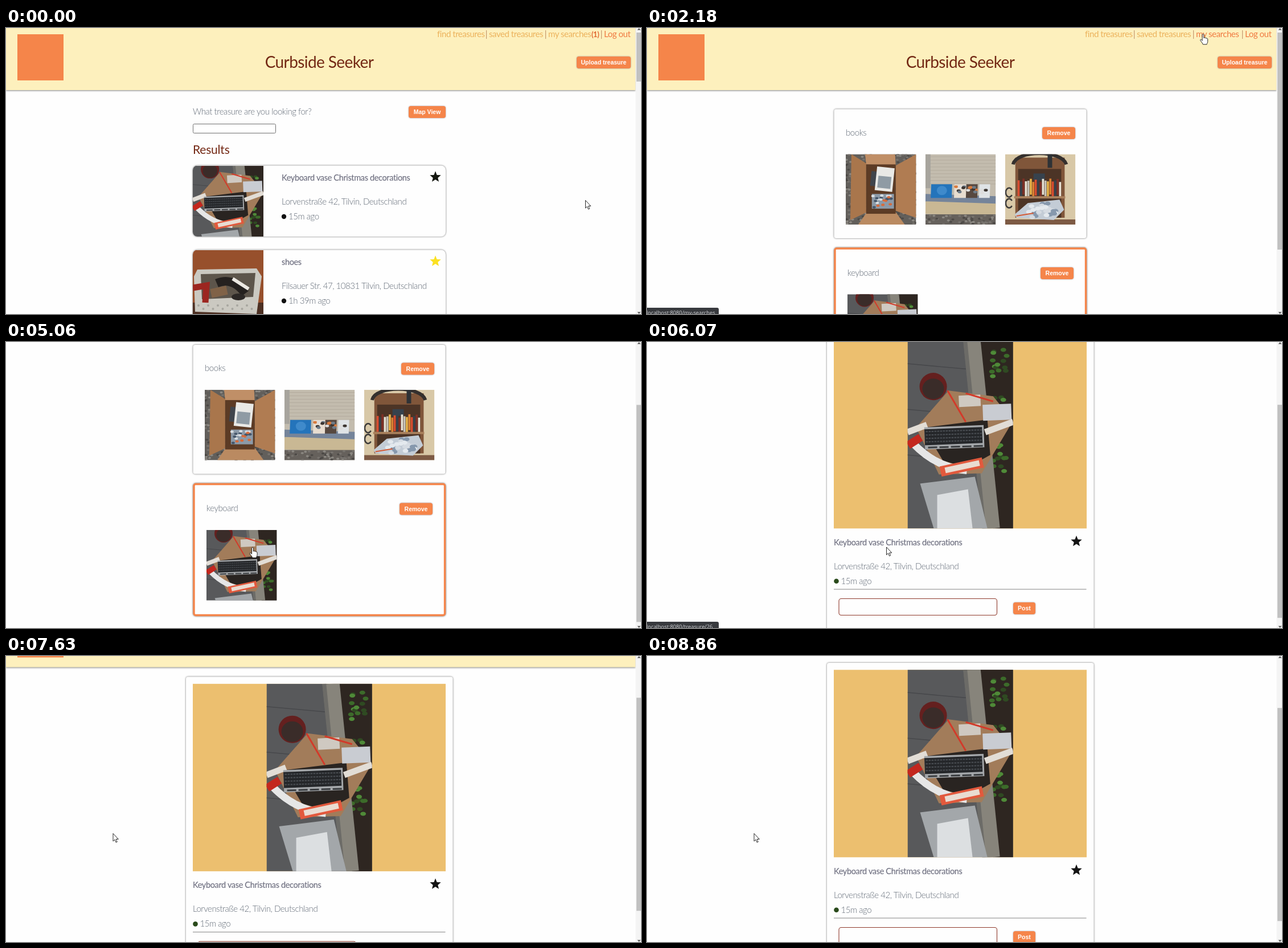
An HTML page that plays this animation: 1115x502 px, repeating every 8.93 s.

```html
<!DOCTYPE html>
<html lang="en">
<head>
<meta charset="utf-8">
<title>Curbside Seeker</title>
<style>
html, body { margin: 0; width: 100%; height: 100%; overflow: hidden; background: #fefefe; }
svg { display: block; width: 100vw; height: 100vh; }
text { font-family: Lato, "Open Sans", sans-serif; white-space: pre; }
.body { font-size: 15px; font-weight: 300; letter-spacing: -.45px; fill: #616a76; }
.name { font-size: 14.5px; letter-spacing: -.35px; fill: #6f7080; stroke: #6f7080; stroke-width: .15px; }
.nav { font-size: 15px; letter-spacing: -.45px; fill: #ecb25c; }
.nav.hot { fill: #f07a41; }
.nav.sep { fill: #8a3a1c; font-weight: 300; }
.nav.count { fill: #e0662f; font-size: 13px; font-weight: 700; }
.title { font-size: 28px; letter-spacing: -.6px; fill: #732814; text-anchor: middle; }
.sub { font-size: 21px; letter-spacing: -.2px; fill: #732814; }
.btn { font: bold 10.5px "Liberation Sans", Arial, sans-serif; fill: #fff; text-anchor: middle; }
.status { font: 9.3px "Open Sans", "Noto Sans", sans-serif; fill: #d3d5d8; }
.card { filter: drop-shadow(0 0 1.6px rgba(0,0,0,.6)); }
.raised { filter: drop-shadow(0 0 1px rgba(90,90,120,.6)); }
.bar { filter: drop-shadow(0 1px 1.6px rgba(0,0,0,.5)); }
</style>
</head>
<body>
<svg id="stage" viewBox="0 0 1115 502" preserveAspectRatio="none"></svg>
<script>
const LOOP = 8930, TICK = 78;
const ORANGE = '#f5854a';

// ---- drawing helpers
const rect = (x, y, w, h, fill, more = '') =>
  `<rect x="${x}" y="${y}" width="${w}" height="${h}" fill="${fill}" ${more}/>`;
const poly = (pts, fill) => `<polygon points="${pts}" fill="${fill}"/>`;
const line = (d, stroke, w, more = '') =>
  `<path d="${d}" fill="none" stroke="${stroke}" stroke-width="${w}" ${more}/>`;
const oval = (x, y, rx, ry, fill) => `<ellipse cx="${x}" cy="${y}" rx="${rx}" ry="${ry}" fill="${fill}"/>`;
const text = (x, y, s, cls, more = '') => `<text x="${x}" y="${y}" class="${cls}" ${more}>${s}</text>`;
const photo = (id, x, y, w = 123.5, h = w, box = '0 0 124 124') =>
  `<svg x="${x}" y="${y}" width="${w}" height="${h}" viewBox="${box}" preserveAspectRatio="xMidYMid slice"><use href="#${id}"/></svg>`;
const times = (n, f) => Array.from({ length: n }, (_, i) => f(i)).join('');

function button(x, y, w, label) {
  return rect(x, y, w, 21, ORANGE, 'rx="4" class="raised"') + text(x + w / 2, y + 14.3, label, 'btn');
}

function star(x, y, fill) {
  const pts = Array.from({ length: 10 }, (_, i) => {
    const r = i % 2 ? 4.5 : 10.2, a = i * Math.PI / 5 - Math.PI / 2;
    return (x + r * Math.cos(a)).toFixed(1) + ',' + (y + r * Math.sin(a)).toFixed(1);
  });
  return poly(pts.join(' '), fill);
}

// seeded blots inside a box
function scatter(n, x, y, w, h, r, tones) {
  let seed = 7 + n;
  const rand = () => (seed = seed * 16807 % 2147483647) / 2147483647;
  return times(n, i =>
    oval((x + w * rand()).toFixed(1), (y + h * rand()).toFixed(1), r, r * .7, tones[i % tones.length]));
}
const cobbles = (x, y, w, h) => scatter(w * h / 40, x, y, w, h, 2.6, ['#8b8882', '#4c4946', '#77736e']);

// ---- photographs as flat shapes
function bagPhoto() {
  return rect(0, 0, 185, 329, '#58595b') +
    times(3, i => line(`M0 ${40 + i * 80}L110 ${50 + i * 80}`, '#47484b', 1.5)) +
    poly('128,0 185,0 185,329 150,329', '#2e2621') +
    times(3, i => scatter(14 + i, 148, 12 + i * 82, 26, 55, 5, ['#3c6b2a', '#2f4a22', '#4f8a38'])) +
    line('M113 0L147 329', '#87847b', 30) + line('M101 0L134 329', '#6c6b67', 7) +
    oval(45, 80, 24, 24, '#64201f') + oval(45, 84, 19, 18, '#3a2c29') +
    poly('15,152 72,87 150,97 185,140 130,232 55,234', '#a27c5a') +
    poly('28,152 140,138 145,200 105,222 62,210', '#292421') +
    line('M90 106L128 104', '#cfc9c1', 20) + line('M132 126L182 124', '#c9ccd2', 28) +
    line('M136 160L185 142M0 160L34 147', '#e2ddd6', 11) +
    line('M10 180Q50 222 104 227', '#e6e6e6', 13) + line('M1 183L23 169', '#c3271e', 14) +
    line('M70 87L102 142M102 92L150 106', '#d23a2a', 3) +
    line('M58 229L132 213', '#e2593d', 18) + line('M66 227L126 214', '#e9dcd2', 10) +
    line('M30 171L134 167', '#a4a7aa', 39) + line('M30 169L131 165', '#25272a', 28) +
    times(4, i => line(`M32 ${159 + i * 6}L130 ${156 + i * 6}`, '#4a4e53', 2, 'stroke-dasharray="3.5 1.5"')) +
    line('M36 187L132 184', '#3a3d40', 3, 'stroke-dasharray="16 4"') +
    poly('22,250 118,238 140,329 46,329', '#a3a7aa') + poly('52,270 106,260 114,329 52,329', '#dcdfe1');
}

function boxPhoto() {
  return rect(0, 0, 124, 124, '#625f5b') + cobbles(0, 0, 124, 124) +
    poly('10,0 36,16 36,103 8,116', '#a9764c') + poly('34,0 87,0 88,20 36,18', '#c08f67') +
    poly('88,20 124,0 124,112 88,100', '#b07c52') + poly('36,104 88,102 104,124 22,124', '#ba8a61') +
    rect(36, 18, 52, 87, '#5c3b25') +
    `<g transform="rotate(6 68 45)">${rect(44, 32, 12, 26, '#40454c')}${rect(53, 23, 31, 42, '#e9e9e6')}${rect(57, 39, 23, 21, '#8f9ba4')}</g>` +
    rect(46, 70, 39, 26, '#8c9aa8') + scatter(24, 48, 72, 34, 22, 3, ['#d9dee2', '#45566a', '#d76b3b']);
}

function ledgePhoto() {
  const book = (x, w, tone) => rect(x, 53, w, 24, tone, `transform="skewX(-2)"`);
  return rect(0, 0, 124, 124, '#c3bcae') +
    times(9, i => rect(8, 4 + i * 6, 116, 1, '#b3ab9d')) + rect(0, 0, 9, 60, '#a7a49d') +
    line('M0 77L124 81', '#75849a', 14) + line('M0 94L124 98', '#c9b894', 22) +
    rect(0, 106, 124, 18, '#66615c') + cobbles(0, 108, 124, 16) +
    book(12, 37, '#2474bb') + oval(29, 64, 9, 8, '#3f8acb') +
    book(53, 21, '#e8ddd0') + book(74, 20, '#57483f') + book(97, 19, '#dfe3e6') +
    scatter(16, 54, 57, 56, 12, 3.5, ['#d8793c', '#ddd', '#6d7b88', '#3c3531']);
}

function shelfPhoto() {
  const tones = ['#d94d31', '#e6b34a', '#e9e3d5', '#38414b', '#d98032', '#c7c2b6', '#7e3027'];
  return rect(0, 0, 124, 124, '#d8c8a7') + rect(0, 115, 124, 9, '#7d5a44') +
    rect(18, 6, 87, 106, '#80563a') + rect(23, 26, 76, 86, '#4c3426') +
    line('M14 18C20 -8 100 -8 108 18', '#34302e', 6) +
    rect(75, 0, 8, 24, '#2e3236') + rect(50, 34, 20, 12, '#37424d') +
    times(18, i => rect(22 + i * 4.3, 46 + 3 * Math.sin(i * 2.3), 3.7, 28, tones[i * 3 % 7])) +
    rect(16, 74, 90, 4, '#a9805c') +
    poly('17,106 40,86 96,80 104,98 86,116 20,112', '#c3ccd6') +
    scatter(28, 42, 86, 54, 26, 5, ['#e4e9ee', '#8698ad', '#d5dbe2']) +
    line('M20 109L50 104', '#d45b36', 2) +
    times(2, i => line(`M12 ${63 + i * 19}a6 8 0 1 0 0 9`, '#3c3a39', 2.6));
}

function shoesPhoto() {
  return rect(0, 0, 124, 124, '#97502c') + rect(0, 92, 124, 32, '#4d3023') +
    poly('8,34 112,32 121,46 112,112 4,108 2,46', '#cbc9c1') + poly('14,42 110,40 106,82 16,86', '#5d554b') +
    times(12, i => oval(10 + i * 8.5, 97 + i % 2 * 6, 2, 2, '#a7a69f')) +
    line('M42 58Q70 46 92 76', '#25211f', 15) + line('M70 50L98 68', '#ece8e2', 6) +
    line('M32 76L60 70', '#806247', 16) + oval(80, 82, 12, 6, '#2c2826') +
    line('M0 66L24 62L22 92', '#9c2620', 11);
}

// ---- page parts
function header(count) {
  const d = count ? -12 : 0;
  return rect(0, -10, 1105.5, 119, '#fdf0bd', 'class="bar"') +
    rect(20, 11, 81, 81, ORANGE) +
    text(550, 70, 'Curbside Seeker', 'title') +
    text(769 + d, 16, 'find treasures', 'nav') + text(854 + d, 16, '|', 'nav sep') +
    text(860 + d, 16, 'saved treasures', 'nav') + text(958 + d, 16, '|', 'nav sep') +
    text(964 + d, 16, 'my searches', 'nav link') +
    (count ? text(1028, 15.5, '(1)', 'nav count') : '') +
    text(1044, 16, '|', 'nav sep') + text(1050, 16, 'Log out', 'nav hot') +
    button(1002, 50, 95, 'Upload treasure');
}

function item(y, id, box, name, place, age, starFill) {
  return rect(328, y, 444, 124.5, '#fefefe', 'rx="8" class="card"') +
    `<clipPath id="clip${id}">${rect(328, y, 140, 124.5, '#000', 'rx="8"')}</clipPath>` +
    `<g clip-path="url(#clip${id})">${photo(id, 328, y + .5, 124, 124, box)}</g>` +
    text(484, y + 26.5, name, 'name') + text(484, y + 68.5, place, 'body') +
    oval(488, y + 89.5, 4.2, 4.2, '#121212') + text(496, y + 94.5, age, 'body') +
    star(754, y + 20, starFill);
}

const STREET = 'Lorvenstraße 42, Tilvin, Deutschland';
const BAG = 'Keyboard vase Christmas decorations';
const CROP = '0 71 185 185';

const pages = {
  list: header(true) +
    text(328, 151.5, 'What treasure are you looking for?', 'body') +
    button(707, 137, 65, 'Map View') +
    rect(328.5, 168.5, 145, 16, '#fff', 'rx="2" stroke="#707070"') +
    text(328, 221, 'Results', 'sub') +
    item(241.5, 'bag', CROP, BAG, STREET, '15m ago', '#14160f') +
    item(389.5, 'shoes', '0 0 124 124', 'shoes', 'Filsauer Str. 47, 10831 Tilvin, Deutschland', '1h 39m ago', '#fbe122'),

  search: header(false) +
    rect(328.5, 142.5, 443, 226.5, '#fefefe', 'rx="4" class="card"') +
    text(349, 188.5, 'books', 'body') + button(694, 174, 58, 'Remove') +
    ['box', 'ledge', 'shelf'].map((id, i) => photo(id, 349 + 139.9 * i, 221.5)).join('') +
    rect(330, 387, 440.5, 230, '#fefefe', `rx="3" stroke="${ORANGE}" stroke-width="3.4" class="card"`) +
    text(352, 434.5, 'keyboard', 'body') + button(691, 420, 58, 'Remove') +
    photo('bag', 352, 467.5, 123.5, 123.5, CROP),

  detail: header(false) +
    rect(316, 126, 468.5, 530, '#fefefe', 'rx="4" class="card"') +
    rect(328, 138.3, 444, 329, '#ecbf6f') +
    photo('bag', 457.5, 138.3, 185.3, 329, '0 0 185 329') +
    text(328, 496.5, BAG, 'name') + star(754, 490, '#141414') +
    text(328, 538.5, STREET, 'body') +
    oval(332.5, 559.8, 4.3, 4.3, '#2a4a1b') + text(340.5, 564.5, '15m ago', 'body') +
    rect(328, 573.5, 443.5, 1, '#858585') +
    rect(337, 590.5, 277.5, 29, '#fefefe', 'rx="4" stroke="#8f3a2c" stroke-width="1.1"') +
    button(643, 597, 39, 'Post')
};
const photos = { bag: bagPhoto, box: boxPhoto, ledge: ledgePhoto, shelf: shelfPhoto, shoes: shoesPhoto };
const groups = (set, get) => Object.keys(set).map(id => `<g id="${id}">${get(set[id])}</g>`).join('');

const stage = document.getElementById('stage');
stage.innerHTML = `<defs>${groups(photos, make => make())}</defs>${groups(pages, p => p)}
  ${rect(1105.5, 0, 10, 502, '#f4f4f4')}${rect(1107, 8, 8, 86, '#c1c1c1', 'id="thumb"')}
  ${poly('1108.5,3.5 1114.5,3.5 1111.5,0.5', '#4a4a4a')}${poly('1108.5,498.5 1114.5,498.5 1111.5,501.5', '#4a4a4a')}
  <g id="status"><path d="M0 491H123Q126 491 126 494V502H0Z" fill="#383a3e"/>${text(-1, 503, '', 'status', 'id="url"')}</g>
  <g fill="#fff" stroke="#111" stroke-width=".9">
  <path id="arrow" d="M0 0V13.6L3 10.8L5 15.6L7.2 14.7L5.2 10H9.3Z"/>
  <path id="hand" d="M4 1.7C4 .2 6.8 .2 6.8 1.7V7.5C7 6.3 9.3 6.4 9.4 7.8C10 6.9 11.8 7.2 11.8 8.6C12.6 8 13.6 8.4 13.6 9.6V13.5C13.6 16 12 17 12 18.8H5.2C4.8 16.5 1.5 13.5 .6 11.6C.1 10.2 1.8 9.6 2.6 10.6L4 12.2Z"/></g>`;

// ---- motion: each move is start, end, then where it goes
const SEARCH_AT = 1950, DETAIL_AT = 5930;
const pointerMoves = [
  [80, 240, 980.5, 52.5], [470, 1090, 969.5, .5], [1720, 1720, 975.5, 1], [1950, 2180, 976, 10.5],
  [3020, 3430, 904, 310.5], [4590, 5020, 432.5, 360.5], [5680, 5680, 420.5, 360], [6300, 6700, 188, 311.5]
];
const scrollMoves = [[3260, 4050, 137.5], [DETAIL_AT, DETAIL_AT, 140], [7390, 8080, 79.5], [8630, 8860, 114]];

const smooth = k => k * k * (3 - 2 * k);
const easeOut = k => 1 - (1 - k) ** 3;

// the picture advances in ticks counted from the start of each move
function follow(moves, from, t, ease) {
  return moves.filter(m => m[0] <= t).reduce((at, [a, b, ...to]) => {
    const ticks = Math.floor((t - a) / TICK) + 1;
    const k = ease(b > a ? Math.min(1, ticks * TICK / (b - a)) : 1);
    return at.map((v, i) => v + (to[i] - v) * k);
  }, from);
}

const $ = id => document.getElementById(id);
const show = (id, on) => $(id).setAttribute('display', on ? 'inline' : 'none');
const move = (id, x, y) => $(id).setAttribute('transform', `translate(${x} ${y})`);
const within = (t, a, b) => t >= a && t < b;
const thumbs = { list: [86, .1], search: [381, .745], detail: [374, .73] };

function draw(t) {
  const page = t < SEARCH_AT ? 'list' : t < DETAIL_AT ? 'search' : 'detail';
  const [top] = follow(scrollMoves, [0], t, easeOut);
  for (const id in pages) show(id, id === page);
  move(page, 0, -top);

  const [size, rate] = thumbs[page];
  $('thumb').setAttribute('y', 8 + top * rate);
  $('thumb').setAttribute('height', size);

  const onLink = within(t, 855, 3020);
  for (const link of document.querySelectorAll('.link')) link.classList.toggle('hot', onLink);

  show('status', within(t, 1260, 3100) || within(t, 5270, 6380));
  $('url').textContent = 'localhost:8080/' + (t < 4000 ? 'my-searches' : 'treasure/26');

  const hand = onLink || within(t, 4930, 6070);
  const [x, y] = follow(pointerMoves, [1017.5, 302.5], t, smooth);
  show('hand', hand);
  show('arrow', !hand);
  move('hand', x - 5, y - .5);
  move('arrow', x, y);
}

function frame() {
  draw(performance.now() % LOOP);
  requestAnimationFrame(frame);
}
frame();
</script>
</body>
</html>
```
